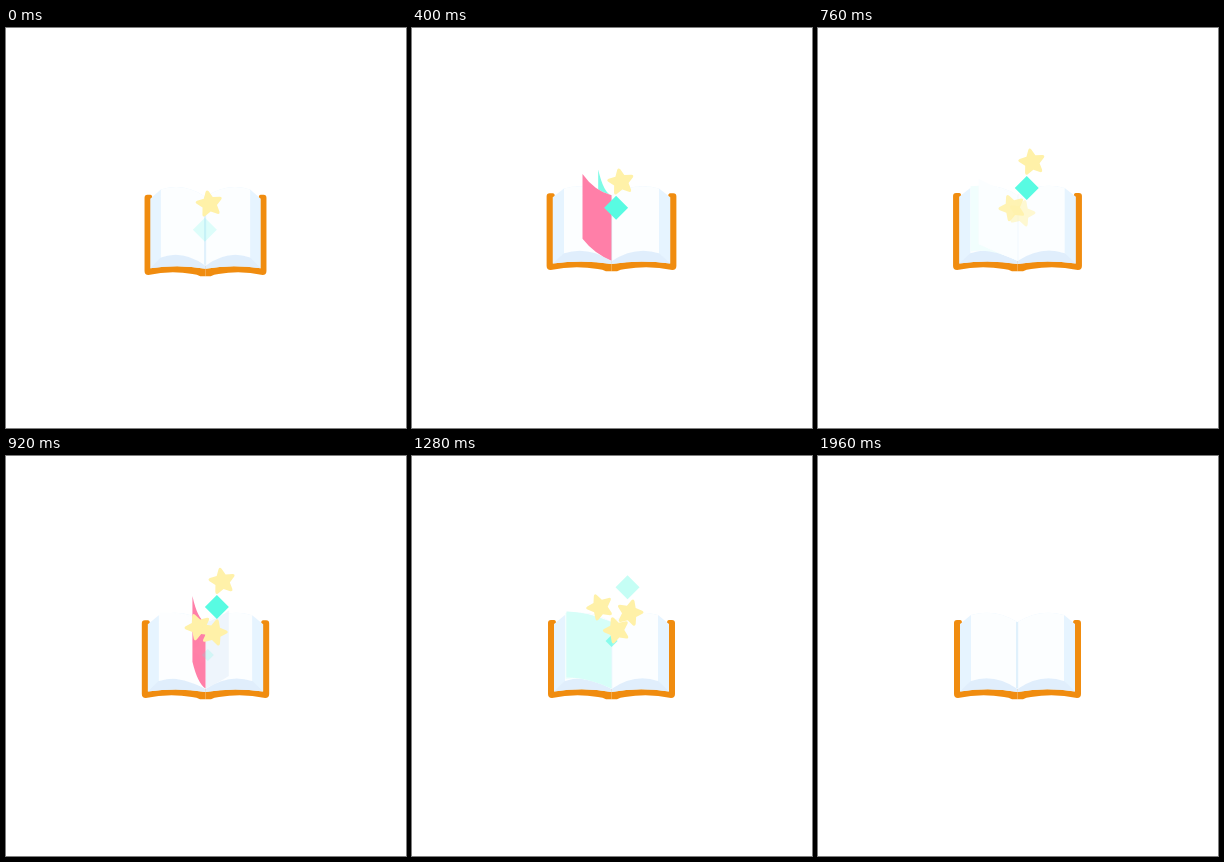
These frames come from a looping animation (400 px wide and 400 px high, 2.64 s). An HTML page with a canvas:

```html
<!DOCTYPE html>
<html lang="en">
<head>
<meta charset="utf-8">
<title>Open book</title>
<style>
html, body { margin: 0; width: 100%; height: 100%; overflow: hidden; background: #fff; }
canvas { display: block; width: 400px; height: 400px; }
</style>
</head>
<body>
<canvas id="stage" width="400" height="400"></canvas>
<script>
const ctx = document.getElementById('stage').getContext('2d');
const LOOP = 2640, STEP = 40, END = 1960, CX = 199.5;
const PINK = '#ff7fa8', TEAL = '#7dfbe6', WHITE = '#fcfeff', STAR = '#fff1a8', GEM = '#58fbe2';

const clamp = v => Math.max(0, Math.min(1, v));

// Later entries lie in front.
const pages = [
  { color: TEAL, start: 112, dur: 800 },
  { color: PINK, start: 179, dur: 480 },
  { color: WHITE, start: 312, dur: 800 },
  { color: TEAL, start: 810, dur: 600 },
  { color: PINK, start: 704, dur: 600 },
  { color: TEAL, start: 850, dur: 600 }
];

const kinds = {
  star: { delay: 50, life: 1460, draw: star },
  gem: { delay: -140, life: 1250, draw: gem }
};

// Each bit leaves the fold when born and drifts sideways by vx px/s.
const bits = [
  { kind: 'gem', born: 85, vx: 13, x: 200, r: 12, color: GEM },
  { kind: 'gem', born: 971, vx: -6, x: 201.5, vy: 39, r: 6, color: '#58fbe2a0' },
  { kind: 'gem', born: 1505, vx: 8, x: 205.5, r: 6, color: PINK },
  { kind: 'star', born: -382, vx: 14, tilt: -10 },
  { kind: 'star', born: 447, vx: -12, tilt: -22 },
  { kind: 'star', born: 550, vx: 27, tilt: 15 },
  { kind: 'star', born: 865, vx: 16, tilt: -20 }
];

function fill(path, color) {
  ctx.fillStyle = color;
  ctx.fill(new Path2D(path));
}

function bookHalf() {
  // cover
  fill('M199.5 243.3H194Q191 241.5 186 241Q163 237 140 242Q136 242 136 238V167Q136 164 139 164H142Q144 164 144 167V233H199.5Z', '#f08c0f');
  // page block, lower leaves, open page
  fill('M142 168L153 159Q177 152 199.5 166V236Q172 231 142 235.5Z', '#e6f4ff');
  fill('M142 235.5L153 225Q176 217 199.5 232V236Q172 231 142 235.5Z', '#e0eefc');
  fill('M153 159Q177 152 199.5 166V233Q176 217 153 225Z', WHITE);
}

function book() {
  bookHalf();
  ctx.save();
  ctx.translate(CX * 2, 0);
  ctx.scale(-1, 1);
  bookHalf();
  ctx.restore();
  ctx.fillStyle = '#e0f1fc';
  ctx.fillRect(198, 166, 2.2, 66);
}

function leaf(page, t) {
  const p = (t - page.start) / page.dur;
  if (p <= 0 || p >= 1) return;
  const turn = 1 - (1 - p) ** 2, a = turn * Math.PI;
  if (turn > 0.97) return;
  const right = turn < 0.5;
  const rise = Math.sin(a) ** 1.5, lift = rise * (right ? 5 : 19.5);
  const x = CX + 46.5 * Math.cos(a), bend = x + (CX - x) * 0.4;
  const shape = new Path2D();
  shape.moveTo(x, 158 - lift);
  shape.quadraticCurveTo(bend, 154 + 10 * rise, CX, 166);
  shape.lineTo(CX, 232.5);
  shape.quadraticCurveTo(bend, 219 + 9 * rise, x, 224 - lift);
  shape.closePath();
  if (!right) {
    ctx.fillStyle = WHITE;
    ctx.fill(shape);
  }
  // the coloured side pales as it lands
  ctx.globalAlpha = right ? clamp(2 * rise - 1) : clamp(1 - (turn - 0.78) / 0.2);
  ctx.fillStyle = right ? '#e6f1fa' : page.color;
  ctx.fill(shape);
  ctx.globalAlpha = 1;
}

function gem({ r, color }) {
  ctx.rotate(Math.PI / 4);
  ctx.fillStyle = color;
  const side = r * Math.SQRT2;
  ctx.fillRect(-side / 2, -side / 2, side, side);
}

function star({ tilt }) {
  ctx.fillStyle = STAR;
  ctx.beginPath();
  for (let i = 0; i < 5; i++) {
    const at = (r, turn) => {
      const a = (i * 72 - 90 + tilt + turn) * Math.PI / 180;
      return [r * Math.cos(a), r * Math.sin(a)];
    };
    ctx.lineTo(...at(12.7, -7));
    ctx.quadraticCurveTo(...at(15, 0), ...at(12.7, 7));
    ctx.lineTo(...at(7.7, 36));
  }
  ctx.closePath();
  ctx.fill();
}

function bit(b, t) {
  const { delay, life, draw } = kinds[b.kind];
  const age = t - b.born, { x = 198, vy = 55 } = b;
  const alpha = clamp((age - delay) / 300) * clamp((life - age) / 160) * clamp((END - t) / 240);
  if (!alpha) return;
  ctx.save();
  ctx.globalAlpha = alpha;
  ctx.translate(x + b.vx * age / 1000, 197 - vy * age / 1000);
  draw(b);
  ctx.restore();
}

function draw(t) {
  ctx.fillStyle = '#fff';
  ctx.fillRect(0, 0, 400, 400);
  // opening hop, then a wide squash that settles
  const hop = Math.exp(-t / 70), swell = 0.022 * clamp((960 - t) / 300);
  ctx.save();
  ctx.translate(CX, 241 + 5 * hop);
  ctx.scale(1 + swell - 0.062 * hop, 1 - 0.8 * swell + 0.048 * hop);
  ctx.translate(-CX, -241);
  book();
  pages.forEach(p => leaf(p, t));
  ctx.restore();
  bits.forEach(b => bit(b, t));
}

function frame() {
  const t = performance.now() % LOOP;
  draw(Math.min(END, Math.floor(t / STEP) * STEP));
  requestAnimationFrame(frame);
}
frame();
</script>
</body>
</html>
```
